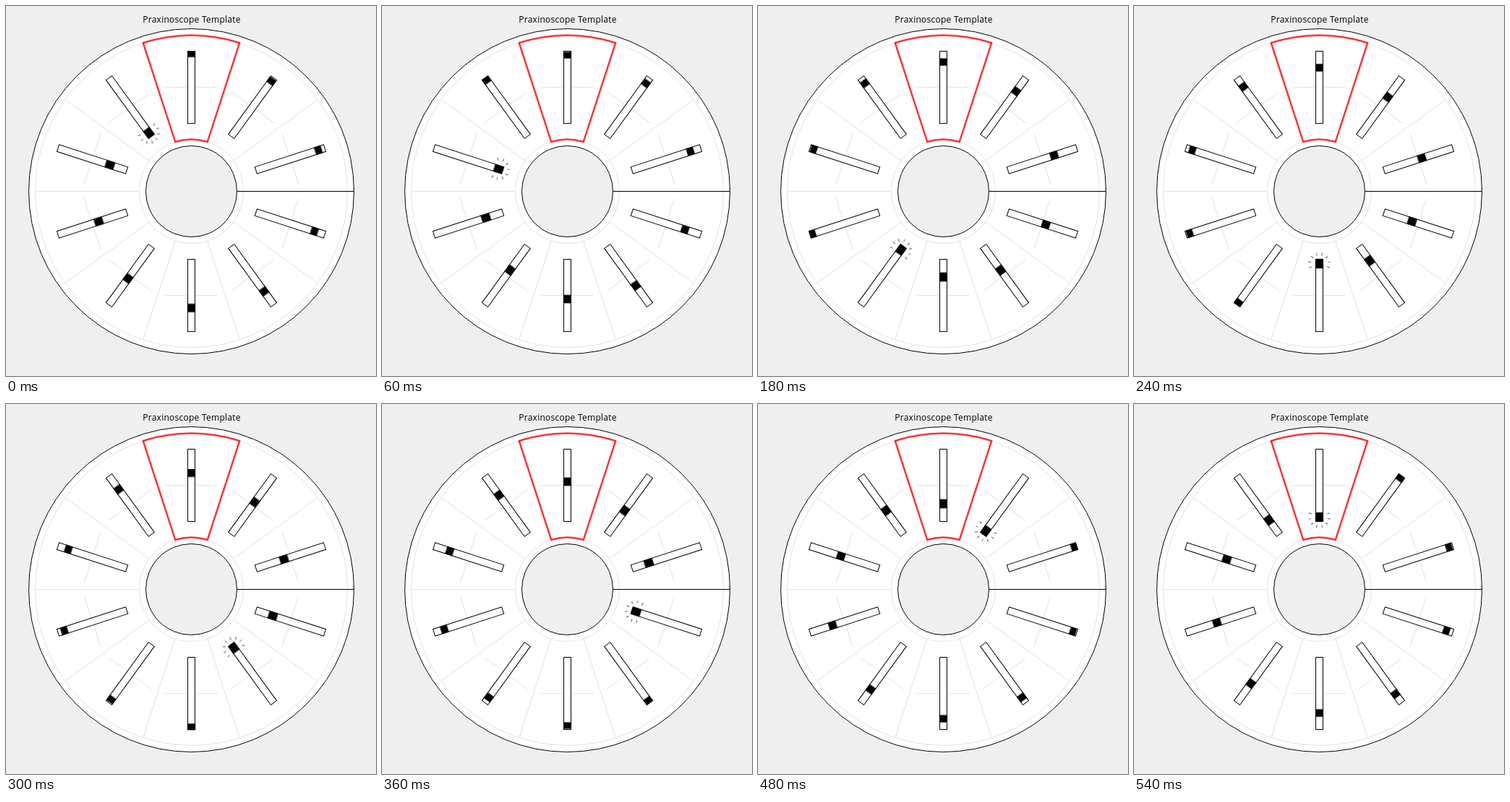
Animation, 512 px wide and 512 px high, one loop 0.6 s. Source, as an HTML page:

```html
<!DOCTYPE html>
<html lang="en">
<head>
<meta charset="utf-8">
<title>Praxinoscope Template</title>
<style>
  html, body { margin: 0; width: 100%; height: 100%; overflow: hidden; background: #efefef; }
  svg { display: block; width: 100%; height: 100%; }
  text { font: 12px "Open Sans", "Noto Sans", sans-serif; letter-spacing: .25px; }
  .line { fill: none; stroke: #000; }
  .guide { fill: none; stroke: #dedede; stroke-width: .8; }
  .spark { stroke: #222; stroke-width: .8; }
  #phases { transform-origin: 0 0; animation: spin 600ms steps(10) infinite; }
  @keyframes spin { to { transform: rotate(-360deg); } }
</style>
</head>
<body>
<svg viewBox="0 0 512 512">
  <text x="257" y="23" text-anchor="middle">Praxinoscope Template</text>
  <g transform="translate(256.5 256.5)">
    <circle r="225" fill="#fff" stroke="#000"/>
    <circle class="guide" r="216"/>
    <circle class="guide" r="72"/>
    <g id="sectors"></g>
    <circle r="63" fill="#efefef" stroke="#000"/>
    <path class="line" d="M63 0H225"/>
    <g id="phases"></g>
    <path id="frame" fill="none" stroke="#f00" stroke-width="2"/>
  </g>
</svg>
<script>
  const COUNT = 10, STEP = 360 / COUNT, OUTER = 216, INNER = 72;
  const byId = id => document.getElementById(id);
  const turned = (i, body) => `<g transform="rotate(${i * STEP})">${body}</g>`;
  const sectors = fn => Array.from({ length: COUNT }, (_, i) => turned(i, fn(i))).join('');

  const sector = () => `
    <path class="guide" d="M-36.5 -144H36.5"/>
    <path class="guide" transform="rotate(${STEP / 2})" d="M0 ${-INNER}V${-OUTER}"/>
    <rect x="-5" y="-194" width="10" height="100" fill="#fff" stroke="#000"/>`;

  // The falling block accelerates and stretches with each phase.
  const block = p => {
    const y = -194 + 0.25 * p + 1.055 * p * p;
    return `<rect x="-5" y="${y}" width="10" height="${8 + p / 2}" stroke="#000" stroke-width=".6"/>`;
  };

  const sparks = () => {
    let out = '';
    for (let a = -22; a <= 202; a += 32)
      out += `<path class="spark" transform="translate(0 -100) rotate(${a})" d="M11.5 0H15.5"/>`;
    return out;
  };

  byId('sectors').innerHTML = sectors(sector);

  // Every phase is visible at once, so turning the set by one sector advances them all.
  byId('phases').innerHTML = sectors(p => block(p) + (p === COUNT - 1 ? sparks() : ''));

  const half = STEP / 2 * Math.PI / 180;
  const at = (r, side) => `${side * r * Math.sin(half)} ${-r * Math.cos(half)}`;
  byId('frame').setAttribute('d',
    `M${at(OUTER, -1)}A${OUTER} ${OUTER} 0 0 1 ${at(OUTER, 1)}` +
    `L${at(INNER, 1)}A${INNER} ${INNER} 0 0 0 ${at(INNER, -1)}Z`);
</script>
</body>
</html>
```
